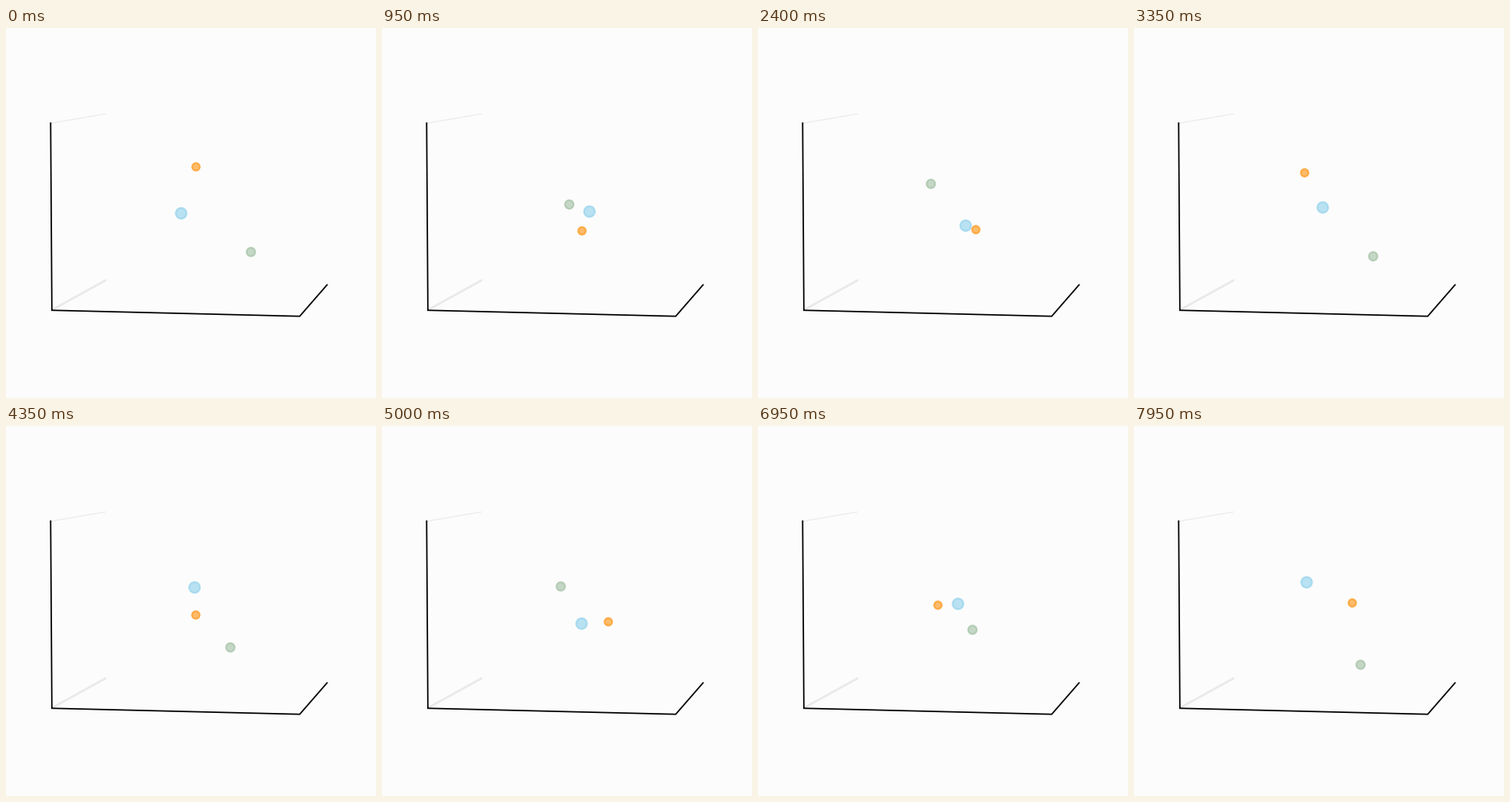
A matplotlib script that plays this animation: 450x450 px, repeating every 8000 ms.

```python
import numpy as np
import matplotlib.pyplot as plt
from matplotlib.animation import FuncAnimation
from matplotlib.patches import Circle

SIZE, DPI = 450, 100
STEP, LOOP = 50, 8000
PX = 72 / DPI  # points per pixel

# Three bodies around a fixed centre of mass
CENTER = np.array([242.8, 226.2])
M_ORANGE, M_GREEN, M_BLUE = 0.784, 1.0, 1.54
M_PAIR = M_ORANGE + M_BLUE


class Swing:
    """A chain of near-radial swings: out from a passage, back to the next.

    passes: times of closest approach; swings: (reach, degrees, spin) between
    them; twist: how much the spin gathers near the passages.
    """

    def __init__(self, passes, swings, twist):
        self.passes, self.swings, self.twist = passes, swings, twist

    def at(self, t):
        i = np.searchsorted(self.passes, t, "right") - 1
        start, end = self.passes[i:i + 2]
        reach, angle, spin = self.swings[i]
        phase = np.pi * ((t - start) / (end - start) - 0.5)
        radius = reach * max(np.cos(phase), 0) ** 0.78
        turn = np.radians(angle + spin * np.tan(self.twist * phase))
        return radius * np.array([np.sin(turn), np.cos(turn)])


# Green about the centre of mass
green_swing = Swing(
    [-853, 853, 2745, 4727, 6776, 8690],
    [(71.9, 50, 0), (79, 225.8, -7.8), (82.3, 40, -9.6),
     (81, 213.4, -9), (75.8, 29.5, -13.7)],
    twist=0.5)

# Blue as seen from orange
pair_swing = Swing(
    [-742, 742, 2490, 3920, 4700, 5520, 6460, 7200, 8760],
    [(59.3, -17.7, 0), (55.3, 187, 11.8), (49.5, 20.5, 22), (33.9, 180.2, 15),
     (35, -81, 12), (41.5, -19, -4.3), (27.2, 91, 5), (61, 246.4, 12)],
    twist=0.98)


def positions(t):
    green = green_swing.at(t)
    gap = pair_swing.at(t)
    middle = -green * M_GREEN / M_PAIR
    orange = middle - gap * M_BLUE / M_PAIR
    blue = middle + gap * M_ORANGE / M_PAIR
    return CENTER + green, CENTER + orange, CENTER + blue


fig = plt.figure(figsize=(SIZE / DPI, SIZE / DPI), dpi=DPI, facecolor="#fcfcfc")
ax = fig.add_axes([0, 0, 1, 1])
ax.set_xlim(0, SIZE)
ax.set_ylim(SIZE, 0)
ax.axis("off")


def line(xs, ys, color, width):
    ax.plot(xs, ys, color=color, lw=width * PX, solid_joinstyle="miter",
            solid_capstyle="butt", zorder=1)


line([55, 121], [115.7, 104.5], "#e8e8e8", 1)
line([56, 121.7], [342.8, 306.5], "#e9e9e9", 2.6)
line([54.3, 55.8, 357.2, 391], [114.8, 343.3, 350.6, 311.8], "black", 1.7)


def body(color, radius, alpha, z):
    dot = Circle((0, 0), radius, fc=color, ec=color, alpha=alpha,
                 lw=2 * PX, zorder=z)
    return ax.add_patch(dot)


bodies = [
    body("#93b695", 5.3, 0.53, 2),
    body("darkorange", 4.7, 0.58, 4),
    body("skyblue", 6.6, 0.58, 3),
]


def update(frame):
    for dot, point in zip(bodies, positions(frame * STEP)):
        dot.center = tuple(point)
    return bodies


anim = FuncAnimation(fig, update, frames=LOOP // STEP, interval=STEP,
                     repeat=True, repeat_delay=0, blit=False)
plt.show()
```
